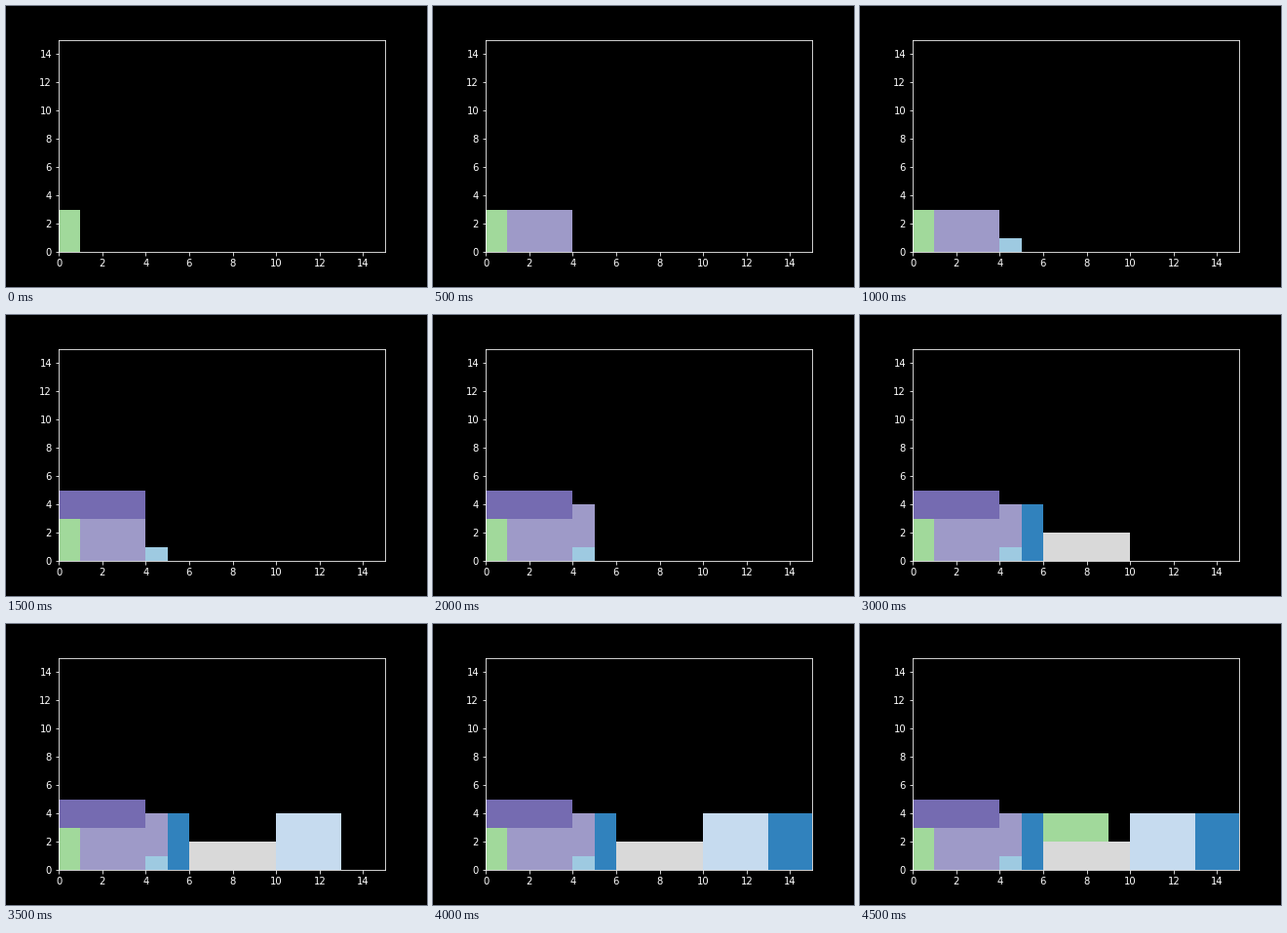
These frames come from a looping animation (432x288 px, 5 s). A matplotlib script:

```python
import matplotlib.pyplot as plt
from matplotlib.animation import FuncAnimation
from matplotlib.patches import Rectangle

SIZE = 15
GREEN, LILAC, PURPLE = "#a1d99b", "#9e9ac8", "#756bb1"
SKY, BLUE, PALE, GREY = "#9ecae1", "#3182bd", "#c6dbef", "#d9d9d9"

# x, y, width, height, colour, in order of placement
BLOCKS = [
    (0, 0, 1, 3, GREEN),
    (1, 0, 3, 3, LILAC),
    (4, 0, 1, 1, SKY),
    (0, 3, 4, 2, PURPLE),
    (4, 1, 1, 3, LILAC),
    (5, 0, 1, 4, BLUE),
    (6, 0, 4, 2, GREY),
    (10, 0, 3, 4, PALE),
    (13, 0, 2, 4, BLUE),
    (6, 2, 3, 2, GREEN),
]

plt.style.use("dark_background")
plt.rcParams.update({"font.family": "DejaVu Sans", "font.size": 10})

fig, ax = plt.subplots(figsize=(6, 4), dpi=72)
fig.subplots_adjust(left=0.125, right=0.9, bottom=0.125, top=0.88)
ax.set(xlim=(0, SIZE), ylim=(0, SIZE),
       xticks=range(0, SIZE, 2), yticks=range(0, SIZE, 2))

patches = [
    ax.add_patch(Rectangle((x, y), w, h, facecolor=color, linewidth=0))
    for x, y, w, h, color in BLOCKS
]


def update(step):
    for i, patch in enumerate(patches):
        patch.set_visible(i <= step)
    return patches


anim = FuncAnimation(fig, update, frames=len(BLOCKS), interval=500,
                     init_func=lambda: update(0), repeat=True)
plt.show()
```
